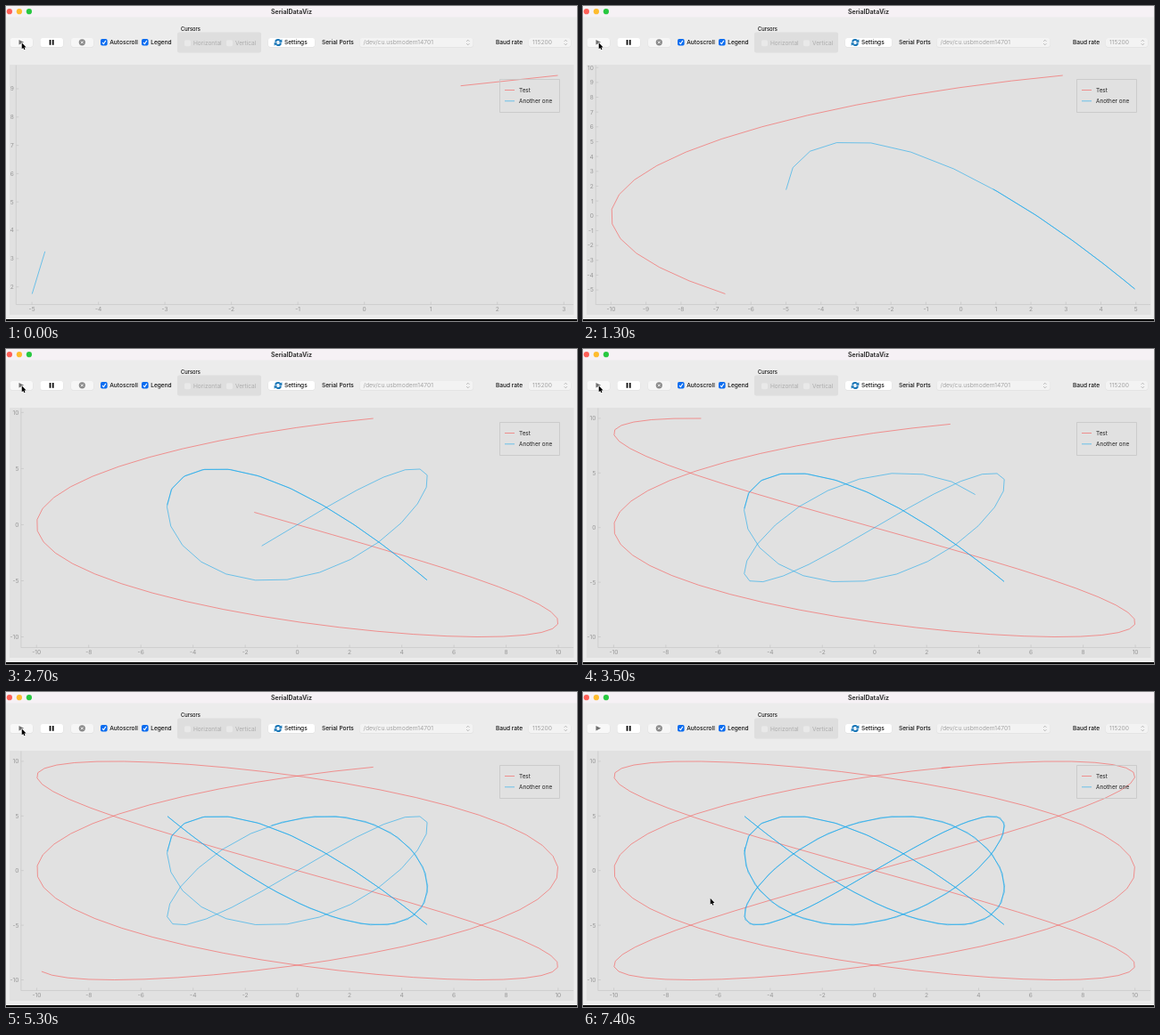
An HTML page with a canvas that plays this animation: 640x354 px, repeating every 7500 ms.

```html
<!DOCTYPE html>
<html lang="en">
<head>
<meta charset="utf-8">
<title>SerialDataViz</title>
<style>
  html, body { margin: 0; height: 100%; overflow: hidden; background: #ececec; }
  canvas { display: block; }
</style>
</head>
<body>
<canvas id="stage" width="640" height="354"></canvas>
<script>
const ctx = document.getElementById('stage').getContext('2d');
const LOOP = 7500, TAU = Math.PI * 2;
const RED = '#fa4a48', BLUE = '#08a4ec', GREY = '#969696';
const TRACE_WIDTH = 0.55;

// Both traces are Lissajous figures sampled at the same phase; one lap is recorded.
const LAP = 126;
const phase = i => -0.622 + 0.04996 * i;
const redPoint = s => [-10 * Math.cos(3 * s), -10 * Math.sin(2 * s)];
const bluePoint = s => [5 * Math.cos(5 * s), -5 * Math.cos(7 * s)];
const trace = (fn, n) => Array.from({ length: n + 1 }, (_, i) => fn(phase(i)));

function text(str, x, y, { color = '#111', size = 6.55, weight = 500, align = 'left' } = {}) {
  ctx.font = `${weight} ${size}px Inter, sans-serif`;
  ctx.fillStyle = color;
  ctx.textAlign = align;
  ctx.fillText(str, x, y + size * 0.364);
}

function box(x, y, w, h, fill, r = 0) {
  ctx.fillStyle = fill;
  ctx.beginPath();
  ctx.roundRect(x, y, w, h, r);
  ctx.fill();
}

function circle(x, y, r, fill) {
  ctx.fillStyle = fill;
  ctx.beginPath();
  ctx.arc(x, y, r, 0, TAU);
  ctx.fill();
}

function line(points, color, width = 1) {
  ctx.strokeStyle = color;
  ctx.lineWidth = width;
  ctx.beginPath();
  points.forEach(p => ctx.lineTo(...p));
  ctx.stroke();
}

function polygon(points, fill) {
  ctx.fillStyle = fill;
  ctx.beginPath();
  points.forEach(p => ctx.lineTo(...p));
  ctx.closePath();
  ctx.fill();
}

function button(x, w, fill = '#fff') {
  box(x - 0.3, 36.2, w + 0.6, 10.4, '#dddddd', 2.8);
  box(x, 36, w, 10, fill, 2.5);
}

function checkbox(x, label) {
  box(x, 37, 7.6, 7.6, '#0a6cf0', 1.8);
  line([[x + 2, 41], [x + 3.4, 42.7], [x + 5.8, 38.9]], '#fff', 1.1);
  text(label, x + 10.2, 41);
}

function disabledCheckbox(x, label) {
  box(x, 38.2, 7, 7, '#e9e9e9', 1.6);
  text(label, x + 10, 42, { color: '#adadad', weight: 400 });
}

function combo(x, w, label) {
  button(x, w, '#f3f3f3');
  text(label, x + 4, 41, { color: '#a3a3a3', weight: 400, size: 6.7 });
  const cx = x + w - 5.7;
  for (const d of [-1, 1])
    line([[cx - 1.6, 41 + d * 1.2], [cx, 41 + d * 2.8], [cx + 1.6, 41 + d * 1.2]], '#a0a0a0', 0.7);
}

function refreshIcon(x, y) {
  for (const turn of [0, Math.PI]) {
    ctx.save();
    ctx.translate(x, y);
    ctx.rotate(turn);
    ctx.strokeStyle = '#1c78b8';
    ctx.lineWidth = 2;
    ctx.beginPath();
    ctx.arc(0, 0, 3, Math.PI * 1.05, Math.PI * 1.8);
    ctx.stroke();
    polygon([[4.4, -3.8], [4.4, 0], [0.6, -0.4]], '#1c78b8');
    ctx.restore();
  }
}

function drawWindow() {
  box(0, 0, 640, 354, '#ececec');
  box(0, 0, 640, 12.5, '#f6f1f5');
  ['#fe5f57', '#febc2e', '#28c840'].forEach((c, i) => circle(3.9 + 11 * i, 6.2, 3.1, c));
  text('SerialDataViz', 320, 6, { weight: 700, size: 7, align: 'center', color: '#333' });

  button(4.5, 25.5, '#f8f8f8');
  polygon([[14.5, 38], [14.5, 43.6], [20, 40.8]], '#707070');
  button(38.5, 25.5);
  box(48.6, 38, 1.8, 5.8, '#111');
  box(51.8, 38, 1.8, 5.8, '#111');
  button(73, 25, '#f6f6f6');
  circle(85.3, 40.8, 3.6, '#8a8a8a');
  line([[83.9, 39.4], [86.7, 42.2]], '#fff', 0.9);
  line([[86.7, 39.4], [83.9, 42.2]], '#fff', 0.9);

  checkbox(106, 'Autoscroll');
  checkbox(152, 'Legend');
  text('Cursors', 196, 26, { size: 5.8 });
  box(192, 29.5, 94, 23, '#dedede', 2);
  disabledCheckbox(200, 'Horizontal');
  disabledCheckbox(247, 'Vertical');

  button(294, 52);
  refreshIcon(305, 41);
  text('Settings', 312, 41);
  text('Serial Ports', 354, 41);
  combo(396.5, 127, '/dev/cu.usbmodem14701');
  text('Baud rate', 549, 41);
  combo(586, 47, '115200');

  box(4, 66, 632.5, 281, '#e1e1e1');
  box(0, 352, 640, 2, '#000');
}

function drawLegend() {
  ctx.strokeStyle = '#c6c6c6';
  ctx.lineWidth = 0.8;
  ctx.strokeRect(553.5, 82.5, 67, 37);
  [['Test', RED], ['Another one', BLUE]].forEach(([label, color], i) => {
    const y = 94.5 + 12.3 * i;
    line([[559, y], [570, y]], color, TRACE_WIDTH);
    text(label, 575, y, { size: 6.4, weight: 400, color: '#222' });
  });
}

function range(points, axis) {
  const values = points.map(p => p[axis]);
  return [Math.min(...values), Math.max(...values)];
}

// Linear map from data range to pixel range; also gives pixels per unit.
function scale([lo, hi], p0, p1) {
  const unit = (p1 - p0) / (hi - lo);
  return { unit: Math.abs(unit), px: v => p0 + (v - lo) * unit, value: p => lo + (p - p0) / unit };
}

function ticks(from, to, step) {
  const list = [];
  for (let v = Math.ceil(from / step) * step; v <= to; v += step) list.push(v);
  return list;
}

function drawPlot(n) {
  const red = trace(redPoint, n), blue = trace(bluePoint, n);
  const sy = scale(range([...red, ...blue], 1), 323.5, 78);
  const yTicks = ticks(sy.value(335), sy.value(66.5), sy.unit > 14 ? 1 : 5);
  ctx.font = '6.6px Inter, sans-serif';
  const left = 7 + Math.max(...yTicks.map(v => ctx.measureText(v).width));

  // The bottom axis is repainted one sample late.
  const shown = Math.max(1, n - 1);
  const xScale = pts => scale(range(pts, 0), left + 18, 618.5);
  const sx = xScale([...red, ...blue]);
  const ax = xScale([...trace(redPoint, shown), ...trace(bluePoint, shown)]);
  const xTicks = ticks(ax.value(left), ax.value(636), ax.unit > 33 ? 1 : 2);

  line([[left, 66.5], [left, 335.5], [636, 335.5]], '#cbcbcb', 0.8);
  const label = { color: GREY, weight: 400, size: 6.6 };
  for (const v of yTicks) {
    const y = sy.px(v);
    line([[left, y], [left + 3, y]], '#c4c4c4', 0.7);
    text(v, left - 2.5, y, { ...label, align: 'right' });
  }
  for (const v of xTicks) {
    const x = ax.px(v);
    line([[x, 335.5], [x, 332.5]], '#c4c4c4', 0.7);
    text(v, x, 340.5, { ...label, align: 'center' });
  }

  const toPixels = ([x, y]) => [sx.px(x), sy.px(y)];
  line(red.map(toPixels), RED, TRACE_WIDTH);
  line(blue.map(toPixels), BLUE, TRACE_WIDTH);
}

function drawPointer(t) {
  const p = Math.min(1, Math.max(0, (t - 6900) / 400));
  const ease = p * p * (3 - 2 * p);
  const shape = [[0, 0], [0, 7], [1.6, 5.6], [2.7, 8], [3.8, 7.5], [2.8, 5.2], [4.9, 5.1]];
  ctx.save();
  ctx.translate(17.7 + 125 * ease, 41.3 + 190.5 * ease);
  line([...shape, shape[0]], '#fff', 1.2);
  polygon(shape, '#000');
  ctx.restore();
}

function frame(now) {
  const t = Math.floor((now % LOOP) / 100) * 100;
  const samples = Math.round(18 + 0.01915 * (t - 1300));
  ctx.lineJoin = 'round';
  drawWindow();
  drawPlot(Math.min(LAP, Math.max(1, samples)));
  drawLegend();
  drawPointer(t);
  requestAnimationFrame(frame);
}
requestAnimationFrame(frame);
</script>
</body>
</html>
```
